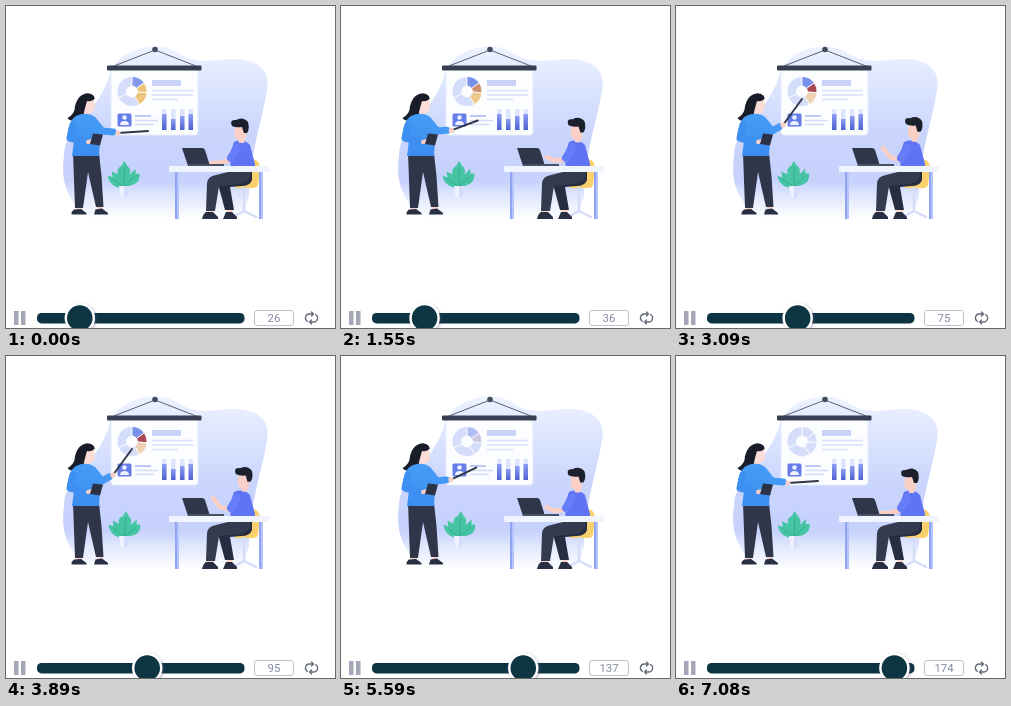
An HTML page for the animation above (7150 ms loop, 329 px wide and 322 px high).

```html
<!DOCTYPE html>
<html lang="en">
<head>
<meta charset="utf-8">
<title>Presentation player</title>
<style>
html, body { margin: 0; width: 100%; height: 100%; overflow: hidden; background: #fff; }
svg { display: block; width: 329px; height: 322px; }
text { font: 11.4px Roboto, Arial, sans-serif; fill: #858aa2; text-anchor: middle; }
.line { fill: none; stroke-linecap: round; stroke-linejoin: round; }
</style>
</head>
<body>
<svg viewBox="0 0 329 322">
  <defs>
    <linearGradient id="sky" x2="0" y2="1">
      <stop offset="0" stop-color="#edf2ff"/><stop offset=".25" stop-color="#dbe4fe"/>
      <stop offset=".5" stop-color="#c9d5fd"/><stop offset=".78" stop-color="#c6d2fc"/>
      <stop offset=".87" stop-color="#e1e8fe"/><stop offset="1" stop-color="#fff"/>
    </linearGradient>
    <linearGradient id="column" x2="0" y2="1">
      <stop offset="0" stop-color="#8d9ef2"/><stop offset="1" stop-color="#5060d2"/>
    </linearGradient>
    <linearGradient id="shirt" x2="0" y2="1">
      <stop offset="0" stop-color="#459df6"/><stop offset="1" stop-color="#3b8cf0"/>
    </linearGradient>
    <filter id="shadow" x="-40%" y="-40%" width="180%" height="180%">
      <feDropShadow dx="1" dy="1" stdDeviation="1.6" flood-color="#558" flood-opacity=".45"/>
    </filter>
  </defs>

  <path fill="url(#sky)" d="M58 150C58 120 92 110 104 67C113 43 150 33 172 47C190 59 205 54 225 53C250 52 265 63 261 84C256 116 244 145 243 190L236 213H90C68 205 53 182 58 150Z"/>

  <!-- board -->
  <path class="line" stroke="#5b6173" d="M108 60L149 44L190 60"/>
  <circle cx="149" cy="43.5" r="2.8" fill="#454b5e"/>
  <path fill="#fcfdff" stroke="#e6ebfd" d="M105 63H192V126Q192 129 189 129H108Q105 129 105 126Z"/>
  <rect x="101" y="59.5" width="94.500" height="5" rx="1" fill="#383f52"/>
  <g id="pie"></g>
  <rect x="146" y="74" width="29" height="6" fill="#c9d3f9"/>
  <path stroke="#d9e0fb" stroke-width="1.7" d="M146 84.5H187M146 89H187M146 93.5H172"/>
  <rect x="111.500" y="107.500" width="14" height="13" rx="1.5" fill="#667ce6"/>
  <circle cx="118.5" cy="111.5" r="2.3" fill="#eef2ff"/>
  <path fill="#eef2ff" d="M114 119Q114 115 118.5 115T123 119Z"/>
  <path stroke="#bdc8f8" stroke-width="2" d="M129 110H145"/>
  <path stroke="#d3dbfa" stroke-width="1.5" d="M129 114.5H152M129 118.5H148"/>
  <path fill="#dde5fe" d="M156 103H160.5V124H156ZM165 103H169.5V124H165ZM174 103H178.5V124H174ZM182.5 103H187V124H182.5Z"/>
  <g fill="url(#column)">
    <rect x="156" y="108" width="4.5" height="16"/><rect x="165" y="113" width="4.5" height="11"/>
    <rect x="174" y="110" width="4.5" height="14"/><rect x="182.5" y="108" width="4.5" height="16"/>
  </g>

  <!-- plant -->
  <g id="plant">
    <path fill="#45c5a3" d="M118 182C109 182 103 177 102 169L107 171L106 165L112 168Q111 162 116 160L119 155L122 160Q126 163 124 169L130 163V168L134 168Q134 177 127 179Z"/>
    <path class="line" stroke="#2fa88e" stroke-width=".8" d="M118 183L119 162M118 181L107 173M118 181L129 171"/>
  </g>
  <path fill="#eef2ff" d="M113 180H123L121.5 190Q118 194 114.5 190Z"/>
  <path fill="#d3dcfb" d="M118 180H123L121.5 190Q120 192 118 192Z"/>

  <!-- presenter -->
  <path fill="#f9d3ca" d="M70 198H76V205H70ZM91 198H96V205H91Z"/>
  <path fill="#30364a" d="M67 147H93L95.500 170L97.500 201H90L82 166L77 202H69Z"/>
  <path fill="#292f42" d="M68 203.5L75 203L80.500 207V208.5H65.5Q65.5 205 68 203.5ZM89.5 203.5L96 202.500L102 207V208.5H88Z"/>
  <path fill="#191d2a" d="M76 89Q83 85 88 90L88 96L80 101Q79 111 71 113Q65 117 61.500 112Q69 108 69 100Q71 92 76 89Z"/>
  <path fill="#fbdcd6" d="M79 95L88 93L89 101Q88 107 84 107L83 111H77L79 102Z"/>
  <path fill="#191d2a" d="M75 92Q82 85 89 92Q86 96 81 95L79 102L75 104Z"/>
  <path fill="url(#shirt)" d="M70 110Q78 106 86 109L95 119L93 150H66L68 135L61 133Q62 115 70 110Z"/>
  <path class="line" id="sleeve" stroke="#4399f5" stroke-width="7"/>
  <path class="line" id="stick" stroke="#30364a" stroke-width="1.9"/>
  <circle id="hand" r="2.6" fill="#f9cfc5"/>
  <path class="line" stroke="#3d90f2" stroke-width="7" d="M67 119L64 132L79 136"/>
  <path class="line" stroke="#f9cfc5" stroke-width="4" d="M82 136L86 135"/>
  <path fill="#2d3347" d="M87 127.500L97 128.500L94 139.500L84 138Z"/>

  <!-- listener -->
  <path fill="#f9d06b" d="M246 153Q254 153 254 163L252 179Q251 182 247 182H229V177H243Z"/>
  <path class="line" stroke="#d5dcf8" stroke-width="2.5" d="M238 182V205M227 211L238 205L250 211"/>
  <path fill="#f9d3ca" d="M201 202H207L206 208H200ZM220 202H226L227 208H222Z"/>
  <path fill="#272d40" d="M246 165V174Q244 180 235 180L224 181L228 204H219L212 178Q212 172 220 170Z"/>
  <path fill="#353b4f" d="M244 165V171Q241 177 232 178L213 180L209 205H200L201 177Q202 170 210 169L226 165Z"/>
  <path fill="#292f42" d="M200 206H207L212 211V213H196Q197 208 200 206ZM220 206H226L231 211V213H217Z"/>
  <path fill="#5e74f5" d="M228 136Q237 132 244 139L249 158V166H226L223 151Z"/>
  <g id="head">
    <path fill="#f9cfc6" d="M229 119H240V130L238 137H233L232 133.500Q228 133 228.5 127Z"/>
    <path fill="#1c202d" d="M226 120Q223 113 230 114Q237 110 242 116Q244 123 241 127H238L236 121Q230 122 226 120Z"/>
  </g>
  <path class="line" id="forearm" stroke="#f9cfc6" stroke-width="4.5"/>
  <path class="line" stroke="#667dfa" stroke-width="8" d="M231 142L225 152"/>
  <path fill="#303649" d="M176 142H196Q198 142 199 144L204 160H182Z"/>
  <path fill="#485066" d="M182 158H218V160H182Z"/>
  <path fill="#b5c4fa" d="M169 165H173V213H169ZM253 165H257V213H253Z"/>
  <path fill="#91a4f3" d="M169 165H171V213H169ZM253 165H255V213H253Z"/>
  <rect x="163" y="160" width="100" height="6" rx="1" fill="#f0f4ff"/>

  <!-- player controls -->
  <path fill="#a5a6b8" d="M8 305H12.5V319H8ZM15 305H19.5V319H15Z"/>
  <rect x="31" y="307" width="207.500" height="10.400" rx="4.500" fill="#0d3443"/>
  <circle id="knob" cy="312" r="14" fill="#0d3443" stroke="#fff" stroke-width="2.4" filter="url(#shadow)"/>
  <rect x="248.5" y="304.5" width="39" height="15" rx="2.5" fill="#fff" stroke="#bfc1d0"/>
  <text id="count" x="268" y="316"></text>
  <path class="line" stroke="#666b79" stroke-width="1.3" d="M301.500 315.500A4 4 0 0 1 303 308H307M305.500 306L307.500 308L305.500 310M309.500 308.500A4 4 0 0 1 308 316H304M305.500 314L303.500 316L305.500 318"/>
</svg>
<script>
const LOOP = 7150;
const $ = id => document.getElementById(id);
const set = (id, name, value) => $(id).setAttribute(name, value);
const mix = (a, b, p) => a + (b - a) * p;
const blend = (a, b, p) => `rgb(${a.map((v, i) => mix(v, b[i], p))})`;
const ease = (n, from, to) => {
  const p = Math.min(1, Math.max(0, (n - from) / (to - from)));
  return p * p * (3 - 2 * p);
};
const pulse = (n, a, b, c, d) => ease(n, a, b) * (1 - ease(n, c, d));

// Ring sector; angles in degrees clockwise from twelve o'clock
function sector(from, to, color, id = '') {
  const at = (r, deg) => {
    const a = deg * Math.PI / 180;
    return `${126 + r * Math.sin(a)} ${85.5 - r * Math.cos(a)}`;
  };
  return `<path id="${id}" fill="${color}" stroke="#fff" stroke-width=".8" d="M${at(15, from)}` +
    `A15 15 0 0 1 ${at(15, to)}L${at(5.5, to)}A5.5 5.5 0 0 0 ${at(5.5, from)}Z"/>`;
}

$('pie').innerHTML =
  [[0, 55], [55, 95], [95, 150], [150, 245], [245, 360]].map(s => sector(...s, '#d4ddf9')).join('') +
  sector(0, 55, '#7891ea', 'blue') + sector(55, 95, '#a94a57', 'red') + sector(95, 150, '#edc57c', 'gold');

const GOLD = [237, 197, 124], RED = [169, 74, 87], PEACH = [238, 208, 178];

function draw(n) {
  const raise = pulse(n, 30, 48, 127, 146);
  const look = pulse(n, 30, 46, 126, 146);
  const point = (x1, y1, x2, y2) => [mix(x1, x2, raise), mix(y1, y2, raise)];
  const hand = point(112, 127, 107, 119);

  set('sleeve', 'd', `M87 114L${point(96, 125, 96, 125)}L${point(107, 126, 103, 121)}`);
  set('stick', 'd', `M${hand}L${point(142, 125, 126, 93)}`);
  set('hand', 'cx', hand[0]);
  set('hand', 'cy', hand[1]);

  set('blue', 'opacity', pulse(n, 19, 28, 126, 146));
  set('red', 'opacity', pulse(n, 18, 26, 122, 142));
  set('gold', 'opacity', pulse(n, 15, 25, 118, 138));
  $('red').style.fill = blend(GOLD, RED, ease(n, 26, 50));
  $('gold').style.fill = blend(GOLD, PEACH, ease(n, 30, 50));

  set('head', 'transform', `translate(${3 * look} ${-1.5 * look}) rotate(${3 * look} 235 135)`);
  set('forearm', 'd', `M225 154L${mix(212, 214, look)} ${mix(157, 151, look)}L${mix(205, 207, look)} ${mix(157, 142, look)}`);
  set('plant', 'transform', `rotate(${2.5 * Math.sin(n * Math.PI / 22)} 118 183)`);

  const count = Math.floor(n);
  set('knob', 'cx', 48.4 + .977 * count);
  $('count').textContent = count;
}

const start = performance.now();
function tick() {
  const t = (performance.now() - start) % LOOP;
  const step = Math.min(104, Math.floor((t - 32) / 67.4));
  draw(t < 70 ? 26 : step * 1.677);
  requestAnimationFrame(tick);
}
tick();
</script>
</body>
</html>
```
